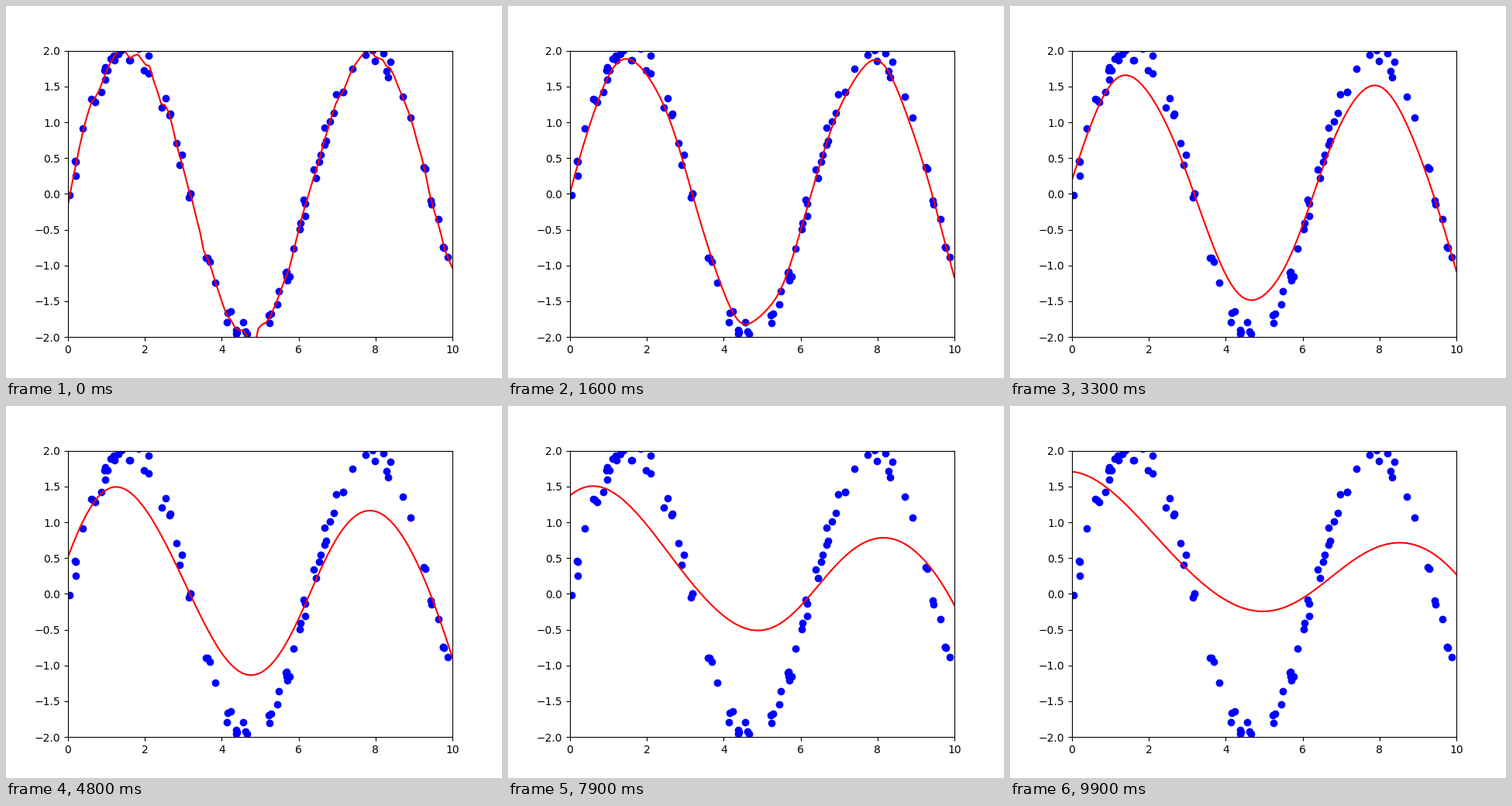
Animation, 640 px wide and 480 px high, one loop 10 s. Source, as a matplotlib script:

```python
import numpy as np
import matplotlib.pyplot as plt
from matplotlib.animation import FuncAnimation

FRAMES = 100

np.random.seed(0)
X = np.sort(np.random.rand(100) * 10)
Y = 2 * np.sin(X) + np.random.normal(0, 0.1, X.size)

grid = np.linspace(0, 10, 100)
widths = np.linspace(0.1, 2, FRAMES)


def local_linear(x0, tau):
    """Gaussian-weighted straight-line fit around x0, evaluated at x0."""
    d = X - x0
    w = np.exp(-d**2 / (2 * tau**2))
    A = np.column_stack([np.ones_like(d), d])
    return (np.linalg.pinv(A.T @ (w[:, None] * A)) @ (A.T @ (w * Y)))[0]


fig, ax = plt.subplots(figsize=(6.4, 4.8), dpi=100)
ax.set_xlim(0, 10)
ax.set_ylim(-2, 2)
ax.scatter(X, Y, color="blue")
line, = ax.plot([], [], color="red")


def update(i):
    line.set_data(grid, [local_linear(x, widths[i]) for x in grid])
    return line,


anim = FuncAnimation(fig, update, frames=FRAMES, interval=100,
                     repeat=True, repeat_delay=0)
plt.show()
```
